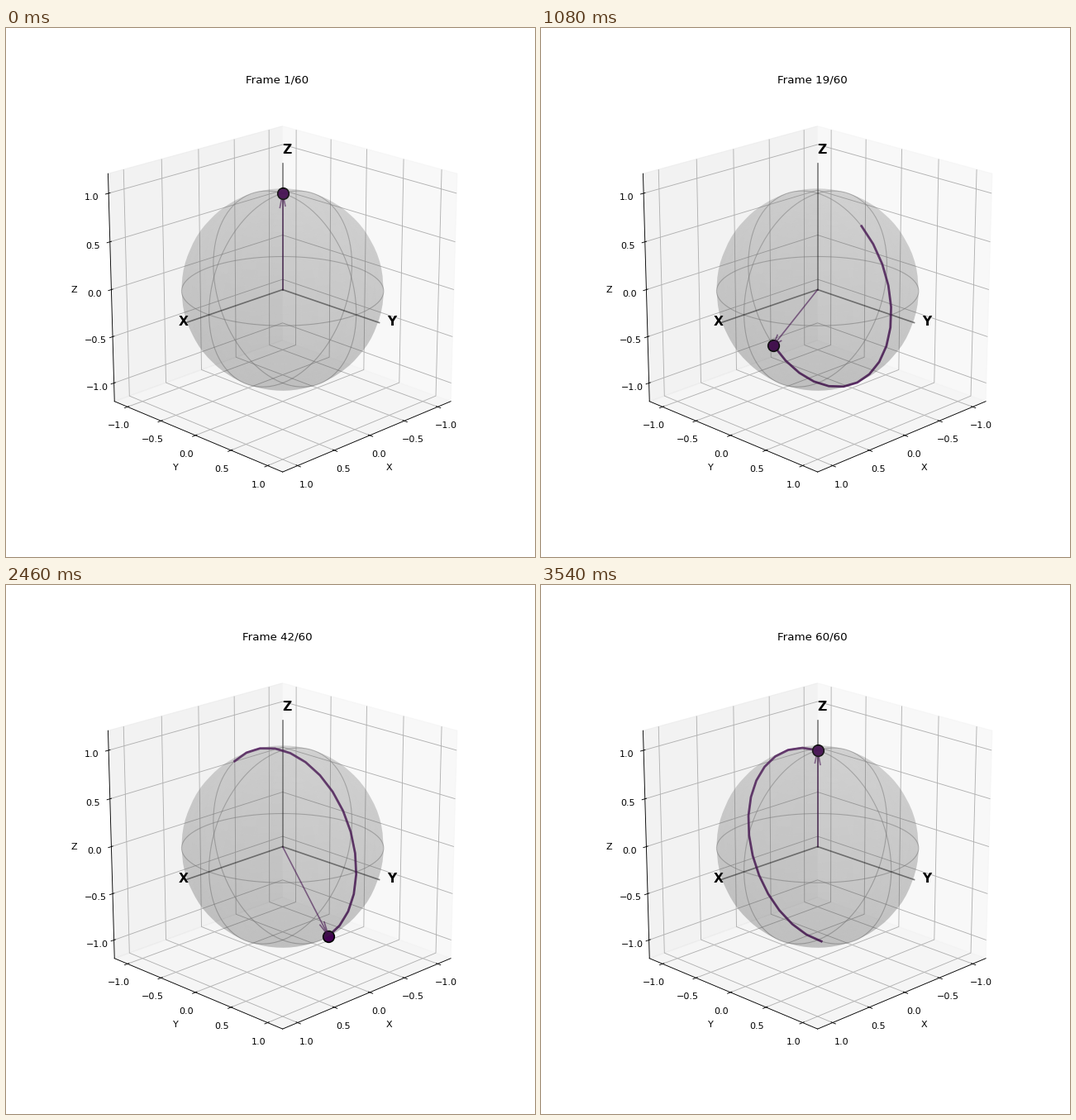
A matplotlib script that plays this animation: 640x640 px, repeating every 3600 ms.

```python
import numpy as np
import matplotlib.pyplot as plt
from matplotlib.animation import FuncAnimation

FRAMES = 60
INTERVAL = 60
TRAIL = 15
LIMIT = 1.2
PURPLE = "#440154"

# Two turns in the y-z plane, starting at the north pole
theta = np.linspace(0, 4 * np.pi, FRAMES)
path = np.column_stack([np.zeros(FRAMES), np.sin(theta), np.cos(theta)])

fig = plt.figure(figsize=(8, 8), dpi=80)
ax = fig.add_subplot(projection="3d")
ax.set(xlim=(-LIMIT, LIMIT), ylim=(-LIMIT, LIMIT), zlim=(-LIMIT, LIMIT),
       xlabel="X", ylabel="Y", zlabel="Z")
for axis in (ax.xaxis, ax.yaxis, ax.zaxis):
    axis.set_ticks(np.linspace(-1, 1, 5))
ax.set_box_aspect((1, 1, 1))
ax.view_init(elev=20, azim=45)


def draw_sphere():
    u = np.linspace(0, 2 * np.pi, 40)
    v = np.linspace(0, np.pi, 40)
    ax.plot_surface(np.outer(np.cos(u), np.sin(v)),
                    np.outer(np.sin(u), np.sin(v)),
                    np.outer(np.ones_like(u), np.cos(v)),
                    color="gray", alpha=0.15, linewidth=0)


def draw_circles():
    t = np.linspace(0, 2 * np.pi, 100)
    c, s, zero = np.cos(t), np.sin(t), np.zeros_like(t)
    for circle in ((c, s, zero), (c, zero, s), (zero, c, s)):
        ax.plot(*circle, color="gray", alpha=0.5, linewidth=1)


def draw_axes():
    for name, unit in zip("XYZ", np.eye(3)):
        ax.plot(*np.outer(unit, [0, 1.3]), color="k", alpha=0.5, linewidth=1.5)
        ax.text(*(1.4 * unit), name, fontsize=14, fontweight="bold")


draw_sphere()
draw_circles()
draw_axes()
trail, = ax.plot([], [], [], color=PURPLE, alpha=0.8, linewidth=2.5)
title = ax.text2D(0.5, 1.02, "", transform=ax.transAxes, ha="center", fontsize=12)
moving = []


def reset():
    while moving:
        moving.pop().remove()
    trail.set_data_3d([], [], [])
    return []


def update(i):
    reset()
    tip = path[i]
    trail.set_data_3d(*path[max(0, i - TRAIL):i + 1].T)
    moving.append(ax.quiver(0, 0, 0, *tip, color=PURPLE, alpha=0.6,
                            linewidth=1.5, arrow_length_ratio=0.15))
    moving.append(ax.scatter(*tip[:, None], s=150, color=PURPLE,
                             edgecolors="black", linewidths=1.5))
    ax.set(xlim=(-LIMIT, LIMIT), ylim=(-LIMIT, LIMIT), zlim=(-LIMIT, LIMIT))
    title.set_text(f"Frame {i + 1}/{FRAMES}")
    return []


anim = FuncAnimation(fig, update, frames=FRAMES, init_func=reset,
                     interval=INTERVAL, repeat=True, repeat_delay=0)
plt.show()
```
